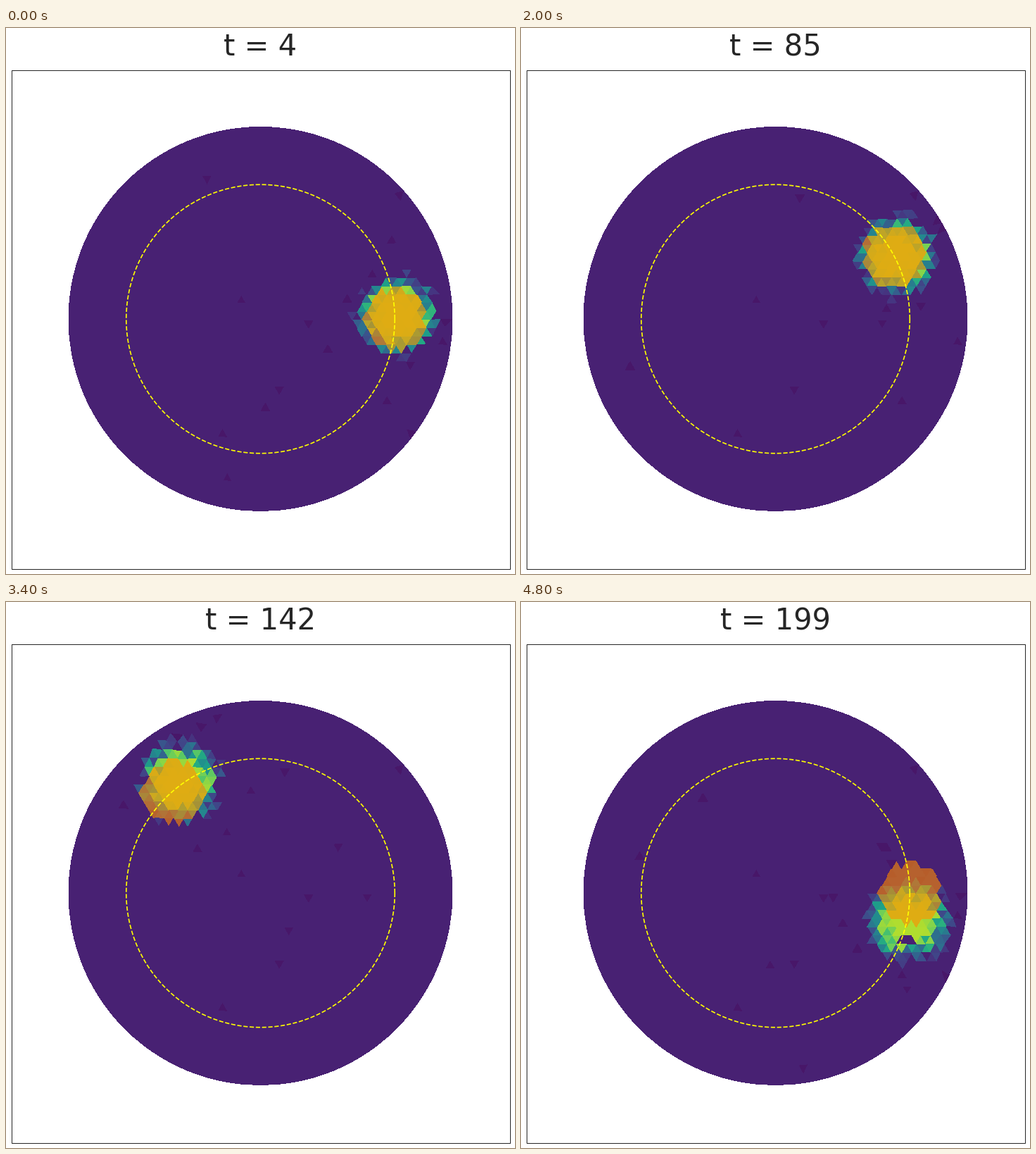
A matplotlib script for the animation above (5 s loop, 723 by 775 pixels).

```python
import numpy as np
import matplotlib.pyplot as plt
from matplotlib.animation import FuncAnimation
from matplotlib.collections import PolyCollection
from matplotlib.colors import to_rgb
from matplotlib.patches import Rectangle
from matplotlib.tri import Triangulation

W, H, DPI = 723, 775, 100
FRAMES, INTERVAL = 25, 200
CENTER, RADIUS = np.array([361.5, 413.0]), 272.5
FIRST_T, LAST_T = 4, 199
INK = "#262626"


def relax_disc_mesh(h=0.05, steps=90):
    """Unit disc filled with near-equilateral triangles, relaxed like a truss."""
    x, y = np.meshgrid(np.arange(-1, 1, h), np.arange(-1, 1, h * np.sqrt(3) / 2))
    x[1::2] += h / 2
    grid = np.column_stack([x.ravel(), y.ravel()])
    grid = grid[np.hypot(*grid.T) < 1 + 0.001 * h]
    a = np.arange(16) * np.pi / 8
    fixed = np.column_stack([np.cos(a), np.sin(a)])
    p = np.vstack([fixed, grid[np.hypot(*grid.T) < 1 - 1e-6]])
    anchor = np.full_like(p, np.inf)

    def triangulate(p):
        tri = Triangulation(p[:, 0], p[:, 1]).triangles
        return tri[np.hypot(*p[tri].mean(axis=1).T) < 1 - 0.001 * h]

    for step in range(steps):
        if np.max(np.hypot(*(p - anchor).T)) > 0.1 * h:
            anchor = p.copy()
            tri = triangulate(p)
            pairs = np.vstack([tri[:, [0, 1]], tri[:, [1, 2]], tri[:, [2, 0]]])
            bars = np.unique(np.sort(pairs, axis=1), axis=0)
        vec = p[bars[:, 0]] - p[bars[:, 1]]
        length = np.hypot(*vec.T)
        rest = 1.2 * np.sqrt(np.mean(length ** 2))
        if step % 30 == 29 and step < steps - 15:
            crowded = bars[rest > 2 * length].ravel()
            crowded = np.unique(crowded[crowded >= len(fixed)])
            if len(crowded):
                p = np.delete(p, crowded, axis=0)
                anchor = np.full_like(p, np.inf)
                continue
        push = (np.maximum(rest - length, 0) / length)[:, None] * vec
        force = np.zeros_like(p)
        np.add.at(force, bars[:, 0], push)
        np.add.at(force, bars[:, 1], -push)
        force[:len(fixed)] = 0
        p += 0.2 * force
        r = np.hypot(*p.T)
        p[r > 1] /= r[r > 1, None]
    return p, triangulate(p)


def on_disc(angle, radius):
    return CENTER + RADIUS * radius * np.array([np.cos(angle), -np.sin(angle)])


def distance(point):
    return np.hypot(*(centroids - point).T)


points, triangles = relax_disc_mesh()
cells = (CENTER + RADIUS * points * [1, -1])[triangles]
centroids = cells.mean(axis=1)

rng = np.random.default_rng(7)
count = len(cells)
steady = rng.random((2, count))
is_steady = rng.random((2, count)) < 0.6
viridis = plt.get_cmap("viridis")
ORANGE = np.array(to_rgb("darkorange"))


def cell_colors(t, frame):
    flicker = np.random.default_rng(100 + frame).random((2, count))
    edge_noise, speck_noise = np.where(is_steady, steady, flicker)

    # The orange disc speeds up cubically; the estimate trails it at high speed.
    angle = 2 * np.pi * (t / LAST_T) ** 3
    speed = 6 * np.pi * t ** 2 / LAST_T ** 3
    guess_angle = angle - 2.5 * speed + np.radians(2)
    guess = on_disc(guess_angle, 0.712)
    d = distance(guess)

    level = 1 / (1 + np.exp((d - 46) / 4.5 - 4 * (edge_noise - 0.5)))
    level[(level < 0.07) | (d > 72)] = 0
    if t > 165:
        tail = np.array([np.sin(guess_angle), np.cos(guess_angle)])
        level[distance(guess + 29 * tail) < 10] = 0
    value = 0.092 + 0.79 * level
    specks = speck_noise < 0.003 + 0.035 * np.exp(-(d / 100) ** 2)
    value[specks & (level == 0)] = 0.062
    rgb = viridis(value)[:, :3]

    covered = distance(on_disc(angle, 0.7)) < 0.16 * RADIUS
    rgb[covered] = 0.4 * rgb[covered] + 0.6 * ORANGE
    return rgb


fig = plt.figure(figsize=(W / DPI, H / DPI), dpi=DPI, facecolor="white")
ax = fig.add_axes([0, 0, 1, 1])
ax.set(xlim=(0, W), ylim=(H, 0))
ax.axis("off")
ax.add_patch(Rectangle((7.5, 59.5), 708, 708, fill=False, ec=INK, lw=0.72))
mesh = PolyCollection(cells, edgecolors="none", antialiaseds=False)
ax.add_collection(mesh)
sweep = np.linspace(0, 2 * np.pi, 400)
ax.plot(CENTER[0] + 0.7 * RADIUS * np.cos(sweep),
        CENTER[1] - 0.7 * RADIUS * np.sin(sweep), "--", color="yellow", lw=1.2)
title = ax.text(361.5, 39, "", ha="center", va="baseline", color=INK,
                family="DejaVu Sans", fontsize=30)


def update(frame):
    t = int(FIRST_T + (LAST_T - FIRST_T) * frame / (FRAMES - 1))
    title.set_text(f"t = {t}")
    mesh.set_facecolor(cell_colors(t, frame))
    return mesh, title


anim = FuncAnimation(fig, update, frames=FRAMES, interval=INTERVAL, repeat=True)
plt.show()
```
